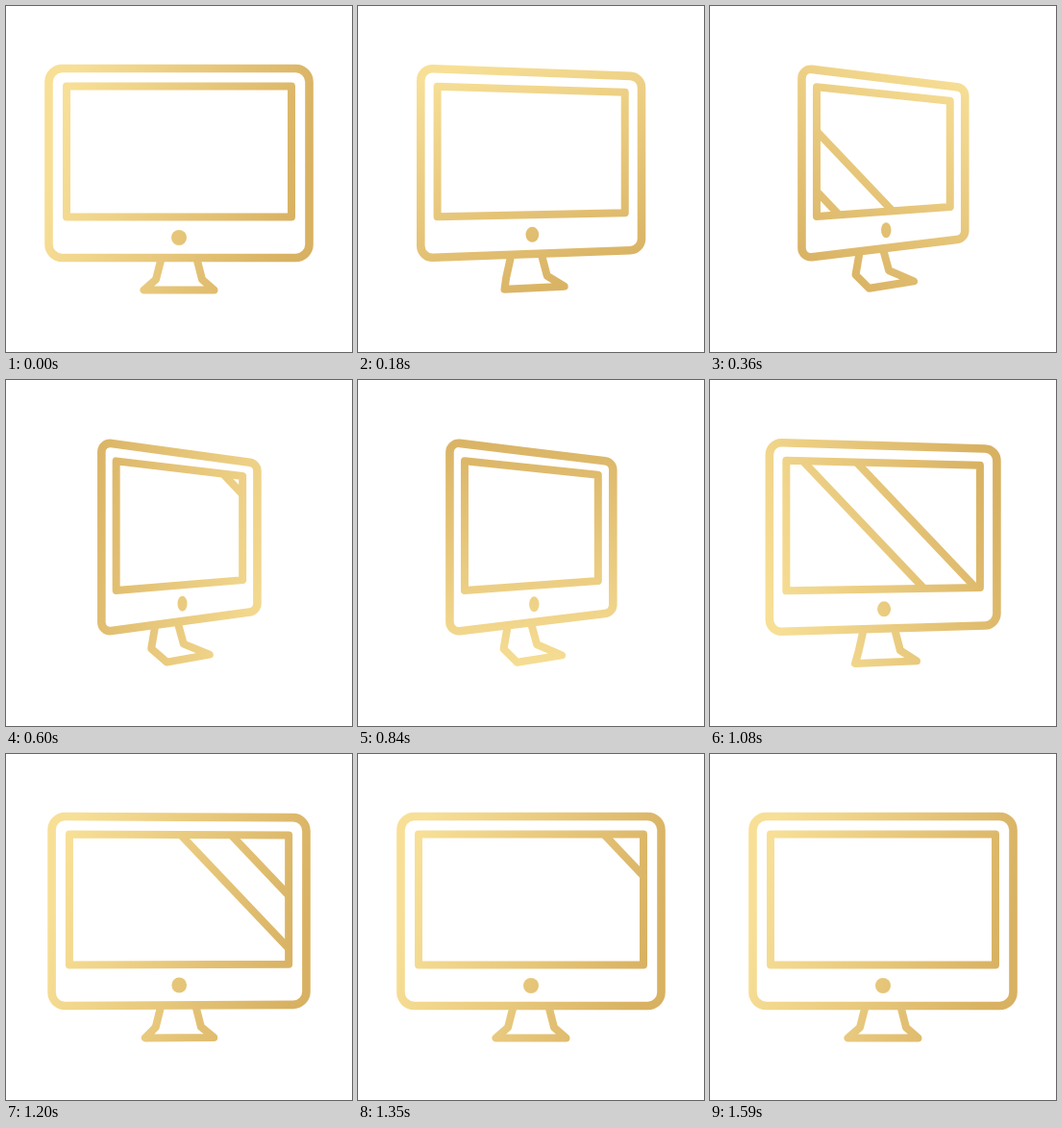
An HTML page with a canvas for the animation above (3.62 s loop, 360x360 px).

```html
<!DOCTYPE html>
<html lang="en">
<head>
<meta charset="utf-8">
<title>Monitor</title>
<style>
  html, body { margin: 0; width: 100%; height: 100%; overflow: hidden; background: #fff; }
  canvas { display: block; width: 360px; height: 360px; }
</style>
</head>
<body>
<canvas id="stage"></canvas>
<script>
const LOOP = 3620, STEP = 30, MOTION = 1590, MID = 180;
const canvas = document.getElementById('stage');
const ctx = canvas.getContext('2d');
const dpr = window.devicePixelRatio || 1;
canvas.width = canvas.height = 360 * dpr;
ctx.scale(dpr, dpr);

const mix = (a, b, k) => a + (b - a) * k;
const clamp = v => Math.max(0, Math.min(1, v));
const smooth = u => u * u * (3 - 2 * u);
const easeOut = u => 1 - (1 - u) ** 2;
const span = (t, start, length) => clamp((t - start) / length);

// Turning squeezes x towards the middle and shrinks heights towards the right.
function turn(x, y, k, squeeze = 0.6, shift = 0, drop = 0) {
  const far = (x - 50) / 265;
  return [
    x + k * ((MID - x) * (1 - squeeze) + shift),
    y + k * (drop - 0.22 * far * (y - 164))
  ];
}

function box(half, top, bottom, k, squeeze) {
  const l = MID - half, r = MID + half;
  return [[l, top], [r, top], [r, bottom], [l, bottom]]
    .map(([x, y]) => turn(x, y, k, squeeze, 0.4));
}

// Stand levels from neck to foot: half width, y, squeeze, shift, drop.
const LEVELS = [[19, 265, 0.63, -13, 1], [24, 284.5, 0.7, -12, 5.5], [36.5, 295.5, 0.61, 9.5, 8.3]];

function stand(k) {
  const side = s => LEVELS.map(([half, y, ...depth]) => turn(MID + s * half, y, k, ...depth));
  return [...side(-1), ...side(1).reverse()];
}

function trace(points, closed = true) {
  ctx.beginPath();
  points.forEach(p => ctx.lineTo(...p));
  if (closed) ctx.closePath();
}

function traceRounded(points, r) {
  const [a, b] = points;
  ctx.beginPath();
  ctx.moveTo((a[0] + b[0]) / 2, (a[1] + b[1]) / 2);
  for (let i = 1; i <= 4; i++) ctx.arcTo(...points[i % 4], ...points[(i + 1) % 4], r);
  ctx.closePath();
}

// The gold sheen makes one full turn around the monitor.
function gold(t) {
  const angle = 0.26 + Math.PI * 2 * span(t, 0, 1200);
  const dx = 132 * Math.cos(angle), dy = 132 * Math.sin(angle);
  const g = ctx.createLinearGradient(MID - dx, 176 - dy, MID + dx, 176 + dy);
  g.addColorStop(0, '#f7df96');
  g.addColorStop(1, '#d8b162');
  return g;
}

// A pair of slanted bars crosses the screen and slows down on its way out.
function drawShine(frame, t, k) {
  const u = t < 800 ? span(t, 203, 690) : span(t, 800, 790);
  if (u <= 0 || u >= 1) return;
  const x = mix(-271, 222, easeOut(u));
  ctx.save();
  trace(frame);
  ctx.clip();
  for (const left of [x, x + mix(52, 60, k)]) {
    trace([[left + 57, 60], [left + 228, 240]], false);
    ctx.stroke();
  }
  ctx.restore();
}

function draw(t) {
  const k = smooth(span(t, 0, 430)) - smooth(span(t, 755, 520));
  const screen = box(117, 83.5, 219.5, k, 0.562);

  ctx.fillStyle = '#fff';
  ctx.fillRect(0, 0, 360, 360);
  ctx.strokeStyle = ctx.fillStyle = gold(t);
  ctx.lineJoin = 'round';
  ctx.lineWidth = 8;

  drawShine(screen, t, k);
  trace(screen);
  ctx.stroke();
  trace(stand(k), false);
  ctx.stroke();

  ctx.lineWidth = 8.6;
  traceRounded(box(135.5, 65, 262, k, 0.598), mix(14, 9, k));
  ctx.stroke();

  ctx.beginPath();
  ctx.ellipse(...turn(MID, 241, k, 0.6, 3.5), mix(8, 5, k), 8, 0, 0, Math.PI * 2);
  ctx.fill();
}

const began = performance.now();
function tick() {
  const t = (performance.now() - began) % LOOP;
  draw(Math.min(MOTION, t - t % STEP));
  requestAnimationFrame(tick);
}
tick();
</script>
</body>
</html>
```
